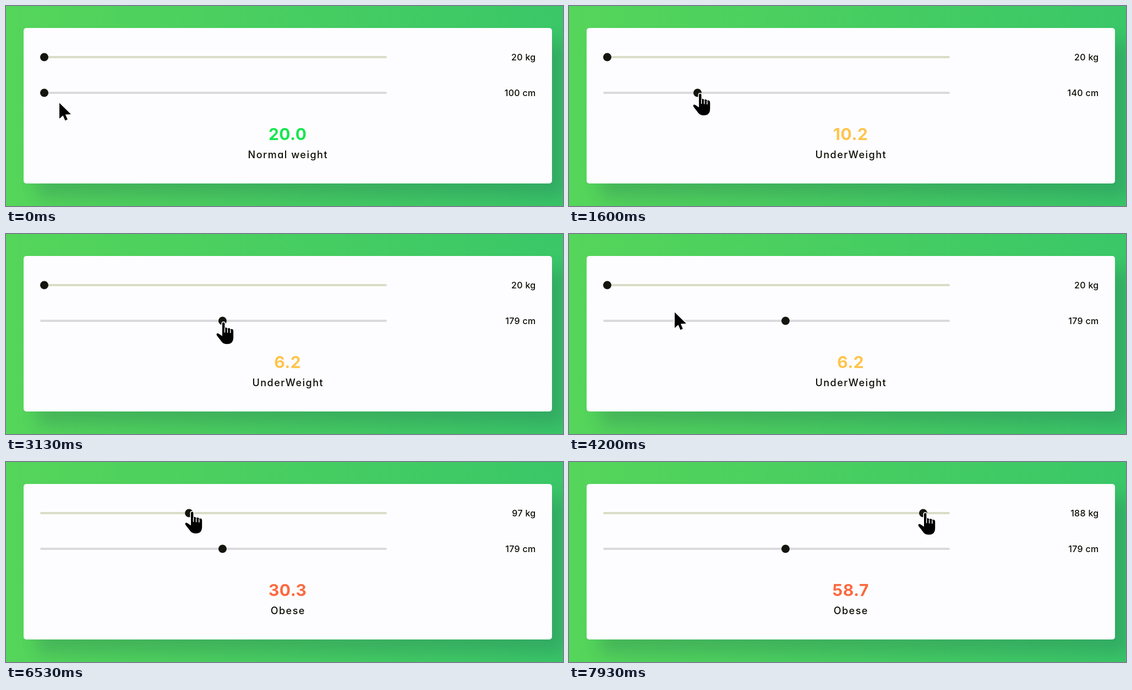
An HTML page for the animation above (8 s loop, 1012 by 364 pixels).

```html
<!DOCTYPE html>
<html lang="en">
<head>
<meta charset="utf-8">
<title>BMI calculator</title>
<style>
html, body { margin: 0; width: 100%; height: 100%; overflow: hidden; }
body { position: relative; background: linear-gradient(to right, #55d55a, #3ac768); }
.card {
  position: absolute; left: 32px; top: 40px; width: 960px; height: 283px;
  border-radius: 5px; background: #fdfdff;
  box-shadow: 25px 25px 30px rgba(20, 60, 80, .2);
}
svg { position: absolute; left: 0; top: 0; }
text {
  font-family: Inter, "Open Sans", sans-serif; font-weight: 500; font-size: 16px;
  font-feature-settings: "cv11"; letter-spacing: .3px; fill: #0c0c04;
}
.end { text-anchor: end; }
.mid { text-anchor: middle; }
#bmi { font-size: 30px; font-weight: 700; letter-spacing: .5px; }
#label { font-size: 18px; letter-spacing: 1.5px; }
.thumb { fill: #151510; }
.shape { fill: #000; stroke: #fff; stroke-width: 3; stroke-linejoin: round; paint-order: stroke; }
.gap { fill: none; stroke: #fff; stroke-width: 1.5; stroke-linecap: round; }
</style>
</head>
<body>
<div class="card"></div>
<svg width="1012" height="364" viewBox="0 0 1012 364">
  <rect x="62" y="91" width="630" height="4" rx="2" fill="#dbdcc6"/>
  <rect x="62" y="156" width="630" height="4" rx="2" fill="#dadade"/>
  <circle id="kgThumb" class="thumb" cy="93" r="7.5"/>
  <circle id="cmThumb" class="thumb" cy="158" r="7.5"/>
  <text id="kg" class="end" x="962.5" y="99"></text>
  <text id="cm" class="end" x="962.5" y="164"></text>
  <text id="bmi" class="mid" x="511.7" y="244"></text>
  <text id="label" class="mid" x="512.3" y="277"></text>
  <g id="cursor">
    <path id="arrow" class="shape" d="M1.5 3.5V32L8 26.3 12 35.5 16.3 33.6 12.4 24.6 22.5 24Z"/>
    <g id="hand" transform="translate(1.2 -1.2)">
      <path class="shape" d="M-2.2 3Q-2.2 1 0 1Q2.2 1 2.2 3V12Q2.5 10.5 4.5 10.5Q7 10.5 7.2 13Q8 11.5 9.8 11.5Q12.3 11.5 12.4 14.3Q13.5 13 15 13.2Q18 13.5 18 17V28Q18 40.5 7 40.5H5Q-1 40.5 -5 34L-12 25Q-13.5 21.5 -11 21Q-9 20.5 -6 23.5L-2.2 26Z"/>
      <path class="gap" d="M2.4 12V19M7.4 13.5V19.5M12.6 15V20"/>
    </g>
  </g>
</svg>
<script>
const LOOP = 8000, RATE = 0.015;
const $ = id => document.getElementById(id);

// [time, value...]
const height = [[670, 100], [1000, 107], [2200, 173], [3133, 179]];
const weight = [[4870, 20], [6000, 78], [6133, 78], [6533, 97], [7933, 188]];
const approach = [[0, 95.5, 173], [530, 75, 159]];
const cross = [[3733, 394, 161], [4200, 190.5, 139], [4600, 80, 95], [4800, 76, 88]];

const bands = [
  [18.5, "UnderWeight", "#ffc44d"],
  [25, "Normal weight", "#19e650"],
  [30, "OverWeight", "#ff884d"],
  [Infinity, "Obese", "#fb6a40"]
];

const mix = (a, b, p) => a + (b - a) * p;
const cmX = v => 69.5 + 615 * (v - 100) / 150;
const kgX = v => 69.5 + 615 * (v - 20) / 180;

function at(keys, t) {
  const n = keys.findIndex(k => k[0] > t);
  if (n <= 0) return keys.at(n).slice(1);
  const a = keys[n - 1], b = keys[n], p = (t - a[0]) / (b[0] - a[0]);
  return a.slice(1).map((v, i) => mix(v, b[i + 1], p));
}

// While dragging, the pointer keeps a slowly drifting grip on the thumb.
function pointer(t, kg, cm) {
  if (t < 670) return at(approach, t);
  if (t < 3733) {
    const p = Math.min(1, (t - 670) / 2463);
    return [cmX(cm) + mix(5.5, 0.5, p), mix(159, 161, p)];
  }
  if (t < 4870) return at(cross, t);
  const p = (t - 4870) / 3063;
  return [kgX(kg) + mix(6.5, 2.5, p), mix(88, 93, p)];
}

function draw(ms) {
  const t = Math.floor(ms * RATE + 0.06) / RATE;
  const [rawKg] = at(weight, t), [rawCm] = at(height, t);
  const kg = Math.round(rawKg), cm = Math.round(rawCm);
  const bmi = kg / (cm / 100) ** 2;
  const [, label, color] = bands.find(b => bmi < b[0]);

  $("kgThumb").setAttribute("cx", kgX(kg));
  $("cmThumb").setAttribute("cx", cmX(cm));
  $("kg").textContent = kg + " kg";
  $("cm").textContent = cm + " cm";
  $("bmi").textContent = bmi.toFixed(1);
  $("bmi").style.fill = color;
  $("label").textContent = label;

  const [x, y] = pointer(t, rawKg, rawCm);
  const hand = (t > 390 && t < 3850) || t > 4660;
  $("cursor").setAttribute("transform", `translate(${x} ${y})`);
  $("hand").style.display = hand ? "" : "none";
  $("arrow").style.display = hand ? "none" : "";
}

const start = performance.now();
function tick() {
  draw((performance.now() - start) % LOOP);
  requestAnimationFrame(tick);
}
tick();
</script>
</body>
</html>
```
